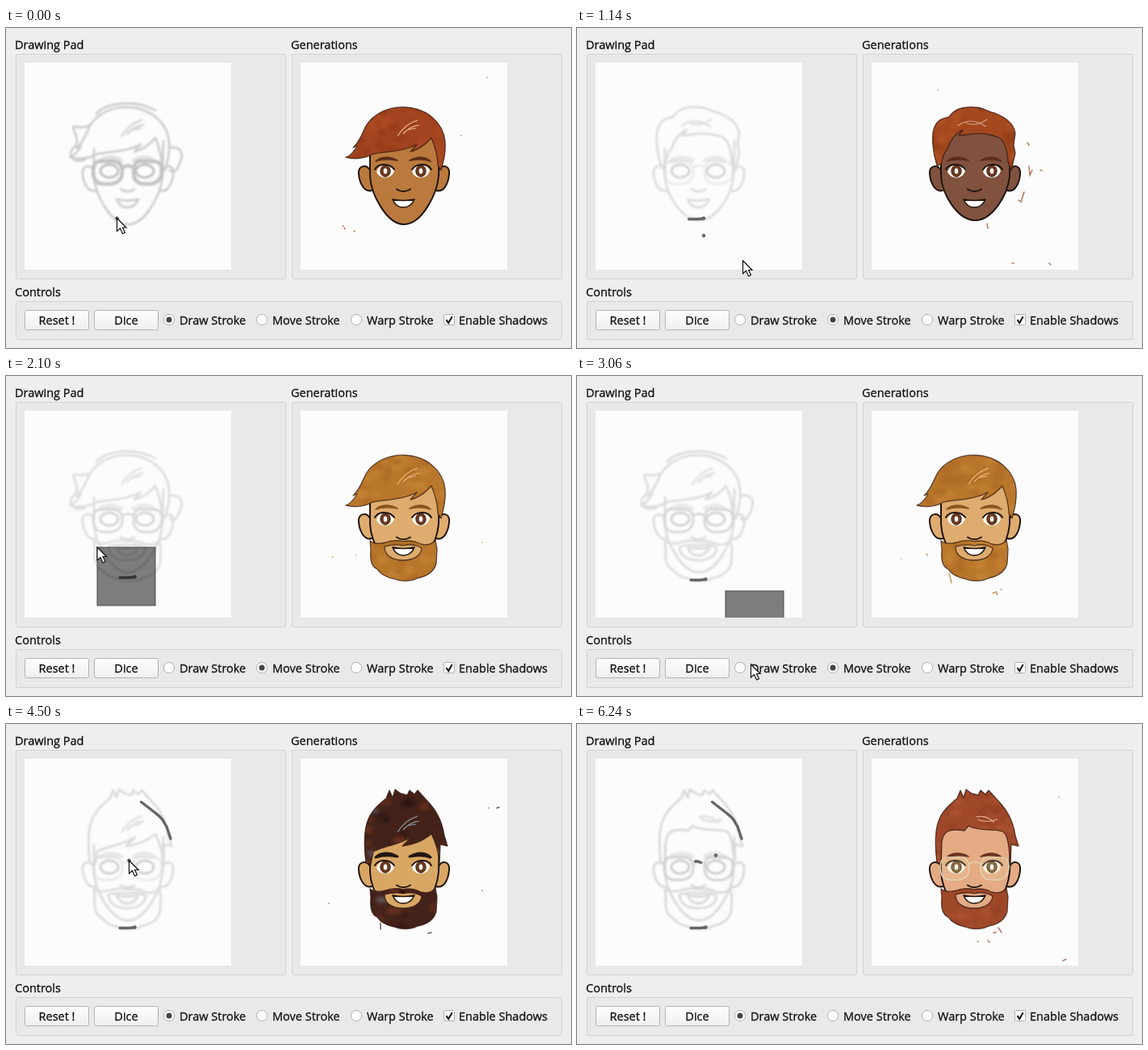
Write an HTML page that moves like this. It is 700 by 396 pixels and loops after 6720 ms.

```html
<!DOCTYPE html>
<html lang="en">
<head>
<meta charset="utf-8">
<title>Portrait drawing pad</title>
<style>
  html, body { margin: 0; width: 100%; height: 100%; overflow: hidden; background: #eeeeee; }
  svg { display: block; }
  text { font: 14.5px "Open Sans", "Noto Sans", sans-serif; fill: #111; stroke: #111; stroke-width: .3px; }
  .panel { fill: #e9e9e9; stroke: #d2d2d2; }
  .button { fill: url(#button); stroke: #b2b2b2; }
  .pad { fill: #fcfcfc; }
  .sketch { fill: none; stroke: #b4b4b4; stroke-width: 2.8; stroke-linecap: round; stroke-linejoin: round; filter: url(#soft); }
  .sketch .bold { stroke-width: 4.5; }
  .ink { stroke: #21140f; stroke-width: 2; stroke-linejoin: round; stroke-linecap: round; }
  .stroke { fill: none; stroke: #666; stroke-width: 3.4; stroke-linecap: round; stroke-linejoin: round; }
  .dot { fill: #777; stroke: #505050; }
</style>
</head>
<body>
<svg width="700" height="396" viewBox="0 0 700 396">
  <defs>
    <linearGradient id="button" x2="0" y2="1"><stop stop-color="#fefefe"/><stop offset="1" stop-color="#efefef"/></linearGradient>
    <filter id="soft"><feGaussianBlur stdDeviation="0.8"/></filter>
    <filter id="mottle"><feGaussianBlur stdDeviation="2"/></filter>
    <clipPath id="padClip"><rect x="23" y="43" width="256" height="256"/></clipPath>
  </defs>
  <rect width="700" height="396" fill="#eeeeee"/>
  <rect class="panel" x="12.5" y="32.5" width="334" height="278" rx="2"/>
  <rect class="panel" x="354.5" y="32.5" width="334" height="278" rx="2"/>
  <rect class="panel" x="12.5" y="338.5" width="676" height="47" rx="2"/>
  <rect class="pad" x="23" y="43" width="256" height="256"/>
  <rect class="pad" x="365" y="43" width="256" height="256"/>
  <text x="11" y="26">Drawing Pad</text>
  <text x="353" y="26">Generations</text>
  <text x="11" y="332">Controls</text>
  <rect class="button" x="23.5" y="349.5" width="79" height="24" rx="2"/>
  <rect class="button" x="109.5" y="349.5" width="79" height="24" rx="2"/>
  <text x="63" y="367" text-anchor="middle">Reset !</text>
  <text x="149" y="367" text-anchor="middle">Dice</text>
  <g fill="#fdfdfd" stroke="#b0b0b0">
    <circle cx="202" cy="361" r="6.6"/><circle cx="317" cy="361" r="6.6"/><circle cx="434" cy="361" r="6.6"/>
    <rect x="542.5" y="354.5" width="13" height="13" rx="1"/>
  </g>
  <circle id="choice" cy="361" r="3.5" fill="#444"/>
  <path d="M545.5 361l2.7 4 4.5-8" fill="none" stroke="#111" stroke-width="2"/>
  <text x="215" y="367">Draw Stroke</text>
  <text x="330" y="367">Move Stroke</text>
  <text x="447" y="367">Warp Stroke</text>
  <text x="561" y="367">Enable Shadows</text>

  <g id="sketches"></g>
  <g id="faces" transform="translate(342)"></g>
  <g clip-path="url(#padClip)">
    <g id="chin"><path class="stroke" pathLength="1" d="M138.5 236.5C145 236.5 151 237 157 235.5"/><circle id="chinEnd" class="dot" cx="157" cy="235.5" r="1.7"/></g>
    <path id="crown" class="stroke" pathLength="1" d="M167.5 96.5L185 110C190 114 194 117 196 122L199 127L204 142"/>
    <path id="bridge" class="stroke" pathLength="1" d="M146.5 170L149.5 170L153.5 171.5"/>
    <circle id="brush" class="dot" r="1.8"/>
    <rect id="patch" width="72" height="72" fill-opacity=".5" stroke="#4a4a4a"/>
  </g>
  <path id="cursor" d="M0 0V16L4 12.5L7 19L10 17.8L7 11.5H11.5Z" fill="#fff" stroke="#111" stroke-width="1.2"/>
</svg>
<script>
const $ = id => document.getElementById(id);

// Facial parts share the pad's coordinates.
const ears = 'M109 176C104 168 94 170 95 181C96 192 102 204 111 201M194 176C199 168 208 170 207 181C206 193 200 204 191 201';
const jaw = chin => `M109 150V183C110 206 130 ${chin} 151 ${chin}C173 ${chin} 192 206 194 183L195 140`;
const forehead = 'C190 100 114 100 109 150Z';
const nose = 'M142 199.5Q150 205 159 199.5';
const mouth = 'M137 212Q150 215 164 212Q160 222 150 222Q141 222 137 212Z';
const brows = 'M116 165C122 159 133 158 143 164C133 162 124 162 116 165ZM158 164C168 158 178 159 184 165C176 162 168 162 158 164Z';
const lashes = 'M115 175C119 168 132 166 139 175M161 175C168 166 181 168 185 175';
const beard = 'M109 204C114 208 120 208 128 206C136 203 146 203 150 205C155 203 165 204 172 208C180 210 186 208 190 203L192 214L191 232C188 243 179 248 168 250C160 255 145 254 139 251C128 249 122 245 118 239C110 236 109 225 110 215Z' +
  'M127 211C127 222 136 228 150 228C164 228 172 222 173 213C165 208 157 208 150 210C143 208 135 209 127 211Z';
const lenses = 'M120 165H132Q144 165 144 178T130 193H122Q108 193 108 178T120 165ZM170 165H182Q194 165 193 178T180 193H172Q158 193 158 178T170 165ZM144 173Q151 168 158 173';
const curls = 'M104 120C92 128 80 116 84 126C90 138 88 146 82 150C76 158 84 168 98 163M203 148C220 146 220 158 214 170C211 178 206 180 203 176M112 106C125 92 160 88 185 102';
const swept = 'M79 160C86 158 90 151 93 146L88 148C96 141 100 129 104 121C113 106 132 97 152 98C180 99 200 118 202 140C203 155 200 165 197 176L193 170C193 158 190 148 185 136C177 145 168 151 159 153L167 144C150 153 128 153 112 156C104 161 92 163 79 160Z';
const cropped = 'M104 170C99 155 97 135 100 125C104 113 111 112 119 110C125 100 136 97 150 98C162 98 167 104 175 105C188 110 199 117 201 130L199 145L201 155L196 176L192 166C191 150 188 139 180 135C165 130 151 130 142 132L131 133L136 126C125 131 120 140 117 150C111 155 111 163 109 169Z';
const peak = 'M104 172C101 150 102 130 106 120C111 106 122 98 129 92L133 82L137 91L140 81L147 86L155 88L158 82L164 87L168 82L177 92C190 105 198 118 201 138L205 151L196 149L195 172';
const peakLong = peak + 'C194 158 190 146 185 136C176 144 162 150 149 151L160 140C145 150 125 151 113 158L110 174Z';
const peakShort = peak + 'C193 152 192 136 185 133C175 129 158 134 143 126L138 132C125 130 112 129 110 146L109 172Z';
const sheen = 'M143 134Q152 119 168 114M150 131Q158 122 170 120M155 126L166 124';
const waves = 'M130 121Q145 109 165 122M137 116Q151 124 166 113';

const looks = [
  { skin: '#ba7a3d', hair: '#a2441f', tones: ['#8f3917', '#b14c25'], path: swept, chin: 243, brow: '#5d2d18', shine: sheen, glow: '#e9b28f', curly: 1, shade: .85,
    specks: 'M77 247l1 2M89 251l1 1M75 245l1 0M254 61h.1M222 133h.1' },
  { skin: '#80523f', hair: '#a4481f', tones: ['#8d3a17', '#b45428'], path: cropped, chin: 238, brow: '#5e2b1b', shine: waves, glow: '#d59a79', shade: .58,
    specks: 'M218 171l1 11 3-6M212 203l-4 12-3-2M216 142l2 3M232 176h2M166 242l1 6M105 77h.1M197 291h2M243 291l2 2' },
  { skin: '#deac6e', hair: '#b9772c', tones: ['#a96720', '#c78638'], path: swept, chin: 243, brow: '#8a521f', shine: sheen, glow: '#efb279', curly: 1, bearded: 1, shade: .55,
    specks: 'M62 224h1M92 222h.1M248 206h.1' },
  { skin: '#deac6e', hair: '#b9772c', tones: ['#a96720', '#c78638'], path: swept, chin: 243, brow: '#8a521f', shine: sheen, glow: '#efb279', curly: 1, bearded: 1, shade: .58,
    specks: 'M91 220l1 2M60 226h.1M173 269l4-2 2 4M183 264h1M119 244l3 12' },
  { skin: '#d9a764', hair: '#43221a', tones: ['#1a100e', '#773822', '#2c1712', '#6b3322', '#4d281d', '#6f7479'], path: peakLong, chin: 243, brow: '#211713', shine: sheen, glow: '#8d969c', bearded: 1, shade: .6,
    specks: 'M266 104l3-1M256 104h.1M248 206h.1M181 259l4-1M122 246l0 8M58 222h.1' },
  { skin: '#e4ab85', hair: '#a0492a', tones: ['#8f3e20', '#ae5634'], path: peakShort, chin: 243, brow: '#6a3320', shine: 'M152 115Q165 112 175 122M154 118Q165 123 179 118', glow: '#e0a68d', bearded: 1, glasses: 1, shade: .65,
    specks: 'M255 90h.1M180 252l4 6M174 258h3M154 269h1M167 268l2 2M260 293l4-2' }
];

function random(seed) {
  return () => (seed = seed * 16807 % 2147483647) / 2147483647;
}

function eye(x, iris) {
  return `<g transform="translate(${x} 177)"><path d="M-11 1Q-8-8 1-8Q9-7 11 0Q8 8 0 8.5Q-8 8-11 1Z" fill="#fffaf4"/>
    <ellipse rx="6.2" ry="7.2" fill="${iris}" stroke="#43251a"/><ellipse rx="2.3" ry="3.6" fill="#fff"/></g>`;
}

function face(look, index) {
  const next = random(71 + index);
  const blobs = Array.from({ length: 90 }, (_, i) =>
    `<ellipse cx="${95 + next() * 112}" cy="${80 + next() * 175}" rx="${4 + next() * 6}" ry="${3 + next() * 4}" fill="${look.tones[i % look.tones.length]}"/>`).join('');
  const growth = look.path + (look.bearded ? beard : '');
  const iris = look.glasses ? '#70522f' : '#6a381f';
  return `<g class="look">
    <clipPath id="hair${index}"><path d="${growth}" clip-rule="evenodd"/></clipPath>
    <path class="ink" d="${ears}" fill="${look.skin}"/>
    <path d="${jaw(look.chin) + forehead}" fill="${look.skin}"/>
    <path class="ink" d="${jaw(look.chin)}" fill="none"/>
    <path d="${growth}" fill="${look.hair}" fill-rule="evenodd"/>
    <g clip-path="url(#hair${index})"><g opacity=".6" filter="url(#mottle)">${blobs}</g></g>
    <path d="${growth}" fill="none" stroke="#33180f" stroke-width="1.3" stroke-linejoin="round" opacity=".75"/>
    <path d="${look.shine}" fill="none" stroke="${look.glow}" stroke-width="1.2"/>
    ${eye(128, iris)}${eye(172, iris)}
    <path class="ink" d="${lashes}" fill="none"/>
    <path d="${brows}" fill="${look.brow}" stroke="${look.brow}" stroke-width="${index == 4 ? 3 : 1.5}" stroke-linejoin="round"/>
    <path class="ink" d="${nose}" fill="none"/>
    <path class="ink" d="${mouth}" fill="#fff" style="stroke-width:1.6"/>
    ${look.glasses ? `<path d="${lenses}" fill="#e5d49a" fill-opacity=".2" stroke="#e2cfb0" stroke-width="1.6"/>` : ''}
    <path d="${look.specks}" fill="none" stroke="${look.hair}" stroke-width="1.5" stroke-linecap="round" opacity=".75"/>
  </g>`;
}

function sketch(look, index) {
  const lines = ears + jaw(look.chin) + look.path + nose + mouth + (look.bearded ? beard : '') + (look.curly ? curls : '');
  return `<g class="sketch" opacity="${look.shade}">
    <path d="${lines}" opacity=".75"/><path d="${look.shine}" opacity=".6"/>
    <path class="bold" d="${brows}" opacity=".45"/>
    <ellipse cx="128" cy="177" rx="11" ry="8"/><ellipse cx="172" cy="177" rx="11" ry="8"/>
    <path d="${lenses}" opacity="${index == 1 || index == 4 ? .4 : .9}" ${index == 0 ? 'class="bold"' : ''}/>
  </g>`;
}

$('faces').innerHTML = looks.map(face).join('');
$('sketches').innerHTML = looks.map(sketch).join('');

const LOOP = 6720, STEP = 60;
const lookStarts = [0, 240, 1620, 2400, 3840, 5700];
const cursorPath = [
  [0, 137.5, 235.5], [240, 157, 236], [420, 157, 257], [660, 157, 257], [960, 317, 358], [1140, 205.5, 288], [1320, 111, 199],
  [1380, 111, 199], [2040, 113, 212], [2220, 113, 212], [2400, 113, 213], [2580, 113, 215], [2700, 113, 215],
  [2940, 184, 266], [3060, 215.5, 357], [3180, 202, 358], [3360, 203, 352], [3600, 167, 96], [3660, 167, 96],
  [3780, 185, 110], [3960, 204, 142], [4200, 204, 142], [4500, 152.5, 169], [4860, 146, 170], [5580, 150.5, 169], [5760, 153, 170]
];

const ramp = (t, from, to) => Math.min(1, Math.max(0, (t - from) / (to - from)));

function along(keys, t) {
  const i = keys.findIndex(key => key[0] > t);
  if (i < 0) return keys[keys.length - 1].slice(1);
  const [a, b] = [keys[i - 1], keys[i]], p = ramp(t, a[0], b[0]);
  return [a[1] + (b[1] - a[1]) * p, a[2] + (b[2] - a[2]) * p];
}

const show = (element, visible) => element.style.display = visible ? '' : 'none';
const place = (element, x, y) => element.setAttribute('transform', `translate(${x} ${y})`);

function trace(path, progress, visible) {
  path.style.strokeDasharray = `${progress} 3`;
  show(path, visible);
}

function render(t) {
  const [x, y] = along(cursorPath, t);
  const moving = t >= 960 && t < 3180;
  const current = lookStarts.filter(start => start <= t).length - 1;
  for (const group of [$('faces'), $('sketches')])
    [...group.children].forEach((child, i) => show(child, i == current));

  $('choice').setAttribute('cx', moving ? 317 : 202);
  place($('cursor'), x, y);
  show($('cursor'), t < 6180);

  const drag = ramp(t, 1380, 2040) * 13 + ramp(t, 2400, 2580) * 3;
  place($('chin'), ramp(t, 1380, 2040) * 2.5, drag);
  trace($('chin').firstChild, ramp(t, 0, 240), true);
  show($('chinEnd'), t >= 240);
  trace($('crown'), ramp(t, 3660, 3960), t >= 3660);
  trace($('bridge'), ramp(t, 4860, 5760), t >= 4860);

  const [brushX, brushY] = t >= 6180 ? [172, 162.5] : t >= 660 && t < 1320 ? [157, 257] : [x, y];
  place($('brush'), brushX, brushY);
  show($('brush'), t < 1320 || t >= 3180);

  const [patchX, patchY] = along(cursorPath, Math.min(t, 2940));
  place($('patch'), patchX, patchY);
  show($('patch'), t >= 1320 && t < 3180);
}

function tick() {
  render(Math.floor(performance.now() % LOOP / STEP) * STEP);
  requestAnimationFrame(tick);
}
tick();
</script>
</body>
</html>
```
